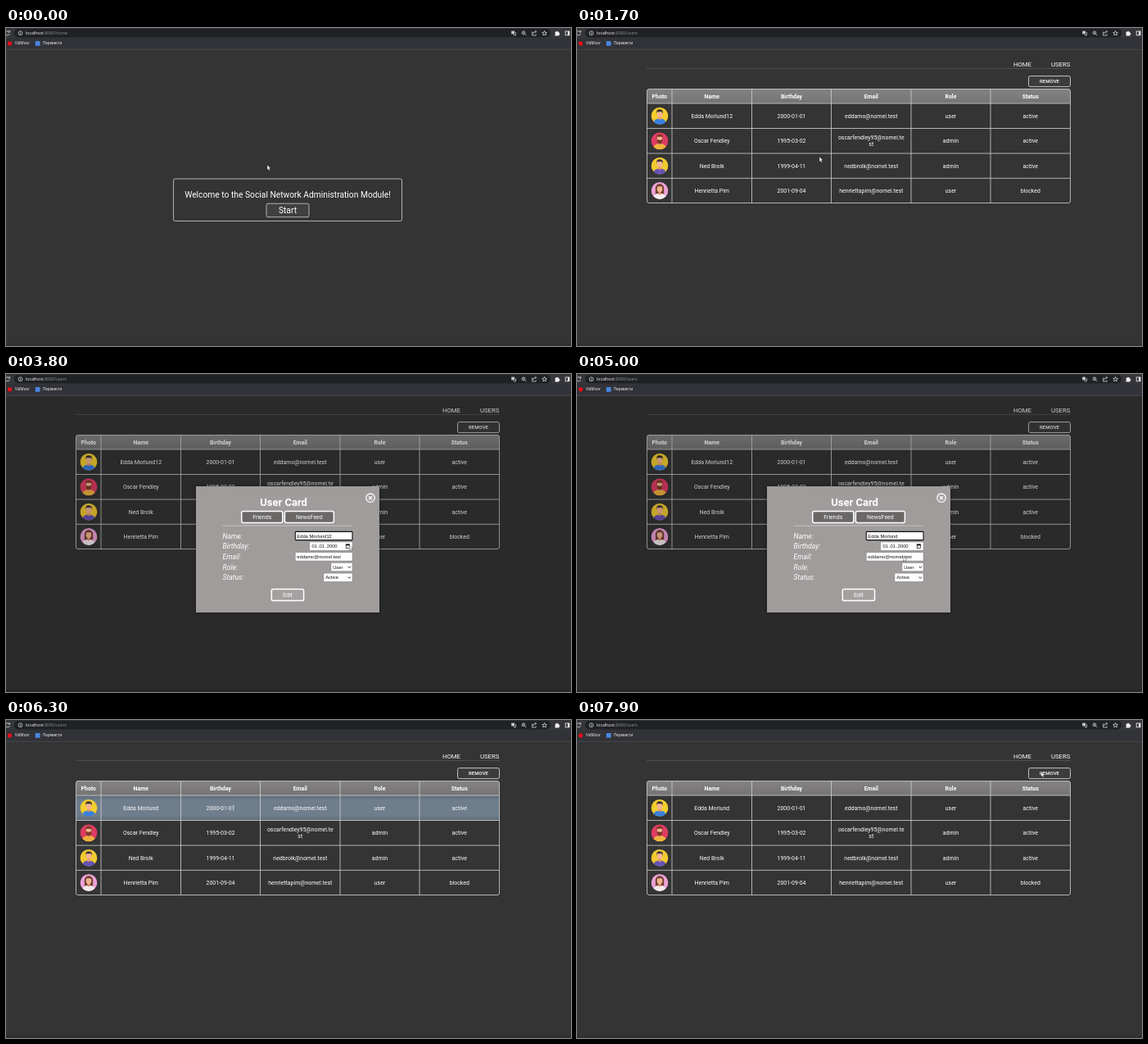
An HTML page that plays this animation: 690 px wide and 388 px high, repeating every 8 s.

```html
<!DOCTYPE html>
<html lang="en">
<head>
<meta charset="utf-8">
<title>Administration module</title>
<style>
  html, body { margin: 0; width: 100%; height: 100%; overflow: hidden; background: #343434; }
  svg { display: block; width: 100vw; height: 100vh; font-family: Roboto, sans-serif; fill: #fff; }
  .chrome { font-family: "Open Sans", sans-serif; }
  .field { font-family: "Liberation Sans", Arial, sans-serif; font-size: 5.8px; fill: #111; }
  .line { fill: none; stroke: #d2d2d2; stroke-width: .8; }
  .icon { fill: none; stroke: #d5d7da; stroke-width: .8; }
  .mid { text-anchor: middle; }
</style>
</head>
<body>
<svg id="stage" viewBox="0 0 690 388"></svg>
<script>
const LOOP = 8000, STEP = 100;
const people = [
  ["Edda Morlund12", "2000-01-01", ["eddamo@nomel.test"], "user", "active"],
  ["Oscar Fendley", "1995-03-02", ["oscarfendley95@nomel.te", "st"], "admin", "active"],
  ["Ned Brolk", "1999-04-11", ["nedbrolk@nomel.test"], "admin", "active"],
  ["Henrietta Pim", "2001-09-04", ["henriettapim@nomel.test"], "user", "blocked"]
];
const looks = [
  { back: "#f3cd2d", shirt: "#397fe0", hair: "#39302f" },
  { back: "#df3c62", shirt: "#efb33c", hair: "#7a3a25", beard: true },
  { back: "#f1ca31", shirt: "#6653b4", hair: "#3d3140" },
  { back: "#eca2d9", shirt: "#f4ecef", hair: "#71402f", long: true }
];
const columns = [85.5, 116, 213.5, 310.5, 408, 505, 602.5];
const rowEdges = [92, 122.5, 153, 183.3, 213.5];
const centre = i => (columns[i] + columns[i + 1]) / 2;

const text = (x, y, size, str, extra = "") =>
  `<text x="${x}" y="${y}" font-size="${size}" ${extra}>${str}</text>`;
const mid = (x, y, size, str, extra = "") => text(x, y, size, str, `class="mid" ${extra}`);
const rect = (x, y, x2, y2, fill, extra = "") =>
  `<rect x="${x}" y="${y}" width="${x2 - x}" height="${y2 - y}" fill="${fill}" ${extra}/>`;
const path = (d, extra = 'class="line"') => `<path d="${d}" ${extra}/>`;
const group = (id, body, extra = "") => `<g id="${id}" ${extra}>${body}</g>`;

function browser() {
  return rect(0, 0, 690, 26, "#323338") + rect(0, 0, 690, 12.5, "#35363a") +
    rect(10, 1, 665, 11.5, "#202124", 'rx="5"') + rect(0, 25.8, 690, 26.6, "#4b4c50") +
    group("reload", path("M4 4.5A2.6 2.6 0 1 0 4.6 7M4.7 3v2.2H2.6", 'class="icon"')) +
    group("stop", path("M0 4l4.4 4.4M4.4 4L0 8.4", 'class="icon"')) +
    '<circle cx="17.5" cy="6.3" r="2.4" class="icon" stroke-width=".6"/>' +
    path("M17.5 5.9v1.7M17.5 4.8v.5", 'class="icon"') +
    `<text x="24" y="8.2" font-size="5.2">localhost<tspan id="url" fill="#8d9197"></tspan></text>` +
    '<circle cx="4.5" cy="18.8" r="2.6" fill="#f00c18"/>' + text(11, 20.4, 4.5, "VidMoor") +
    rect(35.8, 16, 41.6, 21.8, "#4a86e0", 'rx=".6"') + text(45, 20.4, 4.5, "Перевести") +
    group("translate", rect(617.2, 3.6, 621, 7.4, "#c8cacd") + path("M619.8 8.8h2.6V5", 'class="icon"')) +
    '<circle cx="632" cy="5.8" r="1.9" class="icon"/>' + path("M633.5 7.3l1.8 1.8M631 5.8h2", 'class="icon"') +
    path("M643.8 5h-1.2v4h4.6V7.6M644 7c.2-2 1.5-2.6 3.6-2.6M646.3 3l1.5 1.4-1.5 1.4", 'class="icon" stroke-width=".6"') +
    path("M657.6 3.4l.8 2 2.1.1-1.6 1.4.5 2-1.8-1.1-1.8 1.1.5-2-1.6-1.4 2.1-.1z", 'class="icon" stroke-width=".6"') +
    path("M670.5 4.8h1.5a1 1 0 0 1 2 0h1.4v1.4a1 1 0 0 1 0 2v1.2h-4.9v-1.5a1 1 0 0 0 0-1.6z", 'fill="#f1f1f1"') +
    rect(683.2, 4, 688, 8.8, "none", 'stroke="#eee" stroke-width=".8"') + rect(686, 4, 688, 8.8, "#eee");
}

function home() {
  return rect(204.5, 184, 483.5, 235.5, "none", 'class="line" rx="2"') +
    mid(344, 206.8, 10.27, "Welcome to the Social Network Administration Module!") +
    rect(318, 214.2, 370, 230.7, "#404040", 'stroke="#d2d2d2" stroke-width=".8" rx="2"') +
    mid(344, 226.1, 10.3, "Start");
}

function avatar(look, i) {
  const y = (rowEdges[i] + rowEdges[i + 1]) / 2;
  return `<g transform="translate(101 ${y})" clip-path="url(#round)">
    <circle r="10.5" fill="${look.back}"/>
    ${look.long ? `<path d="M-5.2 4V-3a5.2 5.2 0 0 1 10.4 0V4z" fill="${look.hair}"/>` : ""}
    <path d="M-8 11c0-6 3-7.5 8-7.5S8 5 8 11z" fill="${look.shirt}"/>
    <path d="M-1.6 0h3.2v4q-1.6 2-3.2 0z" fill="#dc9273"/>
    <ellipse cy="-2.2" rx="3.3" ry="4.1" fill="#f2b593"/>
    ${look.beard ? `<path d="M-3.5-2.4q0 6 3.5 6t3.5-6q-3.5 3-7 0z" fill="${look.hair}"/>` : ""}
    <path d="M-3.7-2.5q-1-5.4 3.6-5.4 4.8 0 3.8 5.4-.6-2.5-2-2.8-3 .8-4.4 0-.8.7-1 2.8z" fill="${look.hair}"/></g>`;
}

function users() {
  const titles = ["Photo", "Name", "Birthday", "Email", "Role", "Status"];
  let s = mid(544, 46.6, 7.75, "HOME") + mid(590.7, 46.6, 7.75, "USERS") +
    path("M85 49.4H603", 'stroke="#5c5c5c" stroke-width=".7"') +
    rect(551.5, 58.6, 602.5, 71.6, "#3c3c3c", 'stroke="#d2d2d2" stroke-width=".9" rx="2"') +
    mid(577, 67.3, 6.05, "REMOVE", 'font-weight="500"') +
    rect(85.5, 74.5, 602.5, 92, "url(#head)", 'rx="2"') +
    rect(85.5, 92, 602.5, 122.5, "url(#hover)", 'id="hovered"');
  titles.forEach((name, i) => s += mid(centre(i), 85.7, 6.9, name, 'font-weight="700"'));
  people.forEach((row, r) => {
    const y = (rowEdges[r] + rowEdges[r + 1]) / 2 + 2.4;
    s += avatar(looks[r], r);
    row.forEach((cell, c) => [].concat(cell).forEach((line, n, all) =>
      s += mid(centre(c + 1), y + (n - (all.length - 1) / 2) * 8.4, 6.95, line, r + c ? "" : 'id="firstName"')));
  });
  s += rect(85.5, 74.5, 602.5, 213.5, "none", 'class="line" rx="2.5"');
  s += path(rowEdges.slice(0, 4).map(y => `M85.5 ${y}H602.5`).join("") +
    columns.slice(1, 6).map(x => `M${x} 74.5V213.5`).join(""));
  return s;
}

function button(x, y, x2, y2, label, fill) {
  return rect(x, y, x2, y2, fill, 'stroke="#fff" stroke-width="1.5" rx="2.2"') +
    mid((x + x2) / 2, (y + y2) / 2 + 2.6, 7, label);
}

function modal() {
  const field = (x, y) => rect(x, y, 423, y + 10.2, "#fff", 'stroke="#777" stroke-width=".4"');
  const value = (x, y, str, id = "") => `<text class="field" x="${x}" y="${y}" ${id}>${str}</text>`;
  const arrow = y => path(`M417.6 ${y}l1.7 1.7 1.7-1.7`, 'fill="none" stroke="#111" stroke-width=".9"');
  let s = rect(0, 26.6, 690, 388, "#000", 'opacity=".19"') +
    rect(232, 137, 456, 291, "#a09c9b", 'style="filter:drop-shadow(0 0 2px #0006)"') +
    mid(339, 161.3, 13, "User Card", 'font-weight="700"') +
    '<circle cx="445" cy="151.2" r="5.2" fill="none" stroke="#fff" stroke-width="1.3"/>' +
    path("M443 149.2l4 4M447 149.2l-4 4", 'stroke="#fff" stroke-width="1.4"') +
    button(287.7, 167.6, 337.8, 181.5, "Friends", "#6a6767") +
    button(340.4, 167.6, 400.4, 181.5, "NewsFeed", "#6a6767") +
    path("M264.5 185.2H423", 'stroke="#d4d0cf" stroke-width=".7"');
  ["Name:", "Birthday:", "Email:", "Role:", "Status:"].forEach((label, i) =>
    s += text(264.5, 200.5 + i * 12.7, 8.6, label, 'font-style="italic"'));
  s += field(353.3, 192.4) + field(370.8, 205) + field(353.3, 217.8) + field(397, 230.4) + field(388, 243.1) +
    rect(353.3, 192.4, 423, 202.6, "#fff", 'id="focus" stroke="#111" stroke-width="1.1" rx=".8"') +
    value(355.3, 199.6, "", 'id="nameValue"') + value(355.3, 224.9, people[0][2][0]) +
    value(373.6, 212.2, "01") + value(380.7, 212.2, ".") + value(382.6, 212.2, "01") +
    value(389.8, 212.2, ".") + value(391.7, 212.2, "2000") +
    value(399.2, 237.6, "User") + value(390.2, 250.3, "Active") + arrow(234.8) + arrow(247.5) +
    rect(415.2, 208, 419.6, 212.4, "none", 'stroke="#111" stroke-width=".7"') + rect(415, 207.6, 419.8, 209.3, "#111") +
    rect(0, 193.6, .6, 201.4, "#111", 'id="caret"') +
    button(324.3, 262.6, 363.6, 276.6, "Edit", "#a5a1a0");
  return s;
}

const pointers =
  group("arrow", path("M0 0V6.2L1.4 5 2.4 7.2 3.4 6.7 2.5 4.6H4.3z", 'fill="#fff" stroke="#111" stroke-width=".35"')) +
  group("hand", path("M1 .3q.7-.6 1.2.2V3l2.6.6q.8.3.6 1.4L5 7.6H1.7L-.4 4.7q.3-.8 1.4 0z", 'fill="#fff" stroke="#111" stroke-width=".35"')) +
  group("beam", path("M-1 -3H1M0 -3V3M-1 3H1", 'fill="none" stroke="#b9c0c8" stroke-width=".6"'));

document.getElementById("stage").innerHTML = `<defs>
  <clipPath id="round"><circle r="10.5"/></clipPath>
  <linearGradient id="head" x2="0" y2="1"><stop stop-color="#858282"/><stop offset="1" stop-color="#757373"/></linearGradient>
  <linearGradient id="hover" x2="0" y2="1"><stop stop-color="#5f6b78"/><stop offset=".2" stop-color="#6f7e8d"/>
    <stop offset=".8" stop-color="#6f7e8d"/><stop offset="1" stop-color="#5f6b78"/></linearGradient></defs>` +
  rect(0, 0, 690, 388, "#343434") + rect(0, 26, 2.5, 388, "#37373b") + rect(0, 384.5, 690, 388, "#303033") +
  group("home", home()) + group("users", users()) + group("modal", modal()) +
  group("browser", browser(), 'class="chrome"') + group("pointer", pointers);

// time, x, y, pointer shape from that time on
const moves = [
  [0, 319, 167, "arrow"], [400, 341, 220, "hand"], [600, 341, 220, "arrow"], [900, 336, 200, "arrow"],
  [1700, 296, 157, "arrow"], [1800, 291, 131, "arrow"], [2000, 286.5, 113, "arrow"], [2300, 286.5, 115, "arrow"],
  [2700, 300, 124, "arrow"], [3300, 397, 198, "beam"], [3500, 399, 198, "beam"], [3600, 409, 203, "arrow"],
  [3700, 419.3, 208.6, "arrow"], [4900, 419.3, 208.6, "arrow"], [5300, 335.5, 263.5, "hand"],
  [5700, 335.5, 263.5, "hand"], [5800, 326, 240, "arrow"], [6100, 284, 111, "arrow"], [6200, 278, 107, "beam"],
  [6800, 278, 107, "arrow"], [7000, 287, 112, "arrow"], [7400, 443, 150, "hand"], [7600, 443, 150, "hand"],
  [7700, 470, 134, "arrow"], [7900, 566.8, 63, "arrow"], [LOOP, 566.8, 63, "arrow"]
];

const el = id => document.getElementById(id);
const show = (id, on) => el(id).style.display = on ? "" : "none";
const within = (t, ...spans) => spans.some(([a, b]) => t >= a && t < b);

function draw(t) {
  const full = people[0][0], short = full.slice(0, -2);
  show("home", t < 600);
  show("users", t >= 600);
  show("hovered", within(t, [1800, 2100], [6000, 6800]));
  show("modal", within(t, [2100, 5500], [6800, 7700]));
  show("focus", within(t, [3500, 5300]));
  show("caret", within(t, [3500, 3800], [4100, 4700]));
  const loading = within(t, [600, 800], [5500, 5600]);
  show("reload", !loading);
  show("stop", loading);
  show("translate", !loading);
  el("url").textContent = ":8080/" + (t < 600 ? "home" : "users");
  el("firstName").textContent = t < 5500 ? full : short;
  const name = el("nameValue");
  name.textContent = t < 4300 ? full : t < 4400 ? full.slice(0, -1) : short;
  if (within(t, [3500, 4700])) el("caret").setAttribute("x", 355.5 + name.getComputedTextLength());

  const i = moves.findIndex(m => m[0] > t) - 1;
  const [t0, x0, y0, shape] = moves[i], [t1, x1, y1] = moves[i + 1];
  const k = (t - t0) / (t1 - t0);
  el("pointer").setAttribute("transform", `translate(${x0 + (x1 - x0) * k} ${y0 + (y1 - y0) * k})`);
  ["arrow", "hand", "beam"].forEach(p => show(p, p === shape));
}

const start = performance.now();
function tick() {
  const t = (performance.now() - start) % LOOP;
  draw(Math.floor(t / STEP) * STEP);
  requestAnimationFrame(tick);
}
tick();
</script>
</body>
</html>
```
